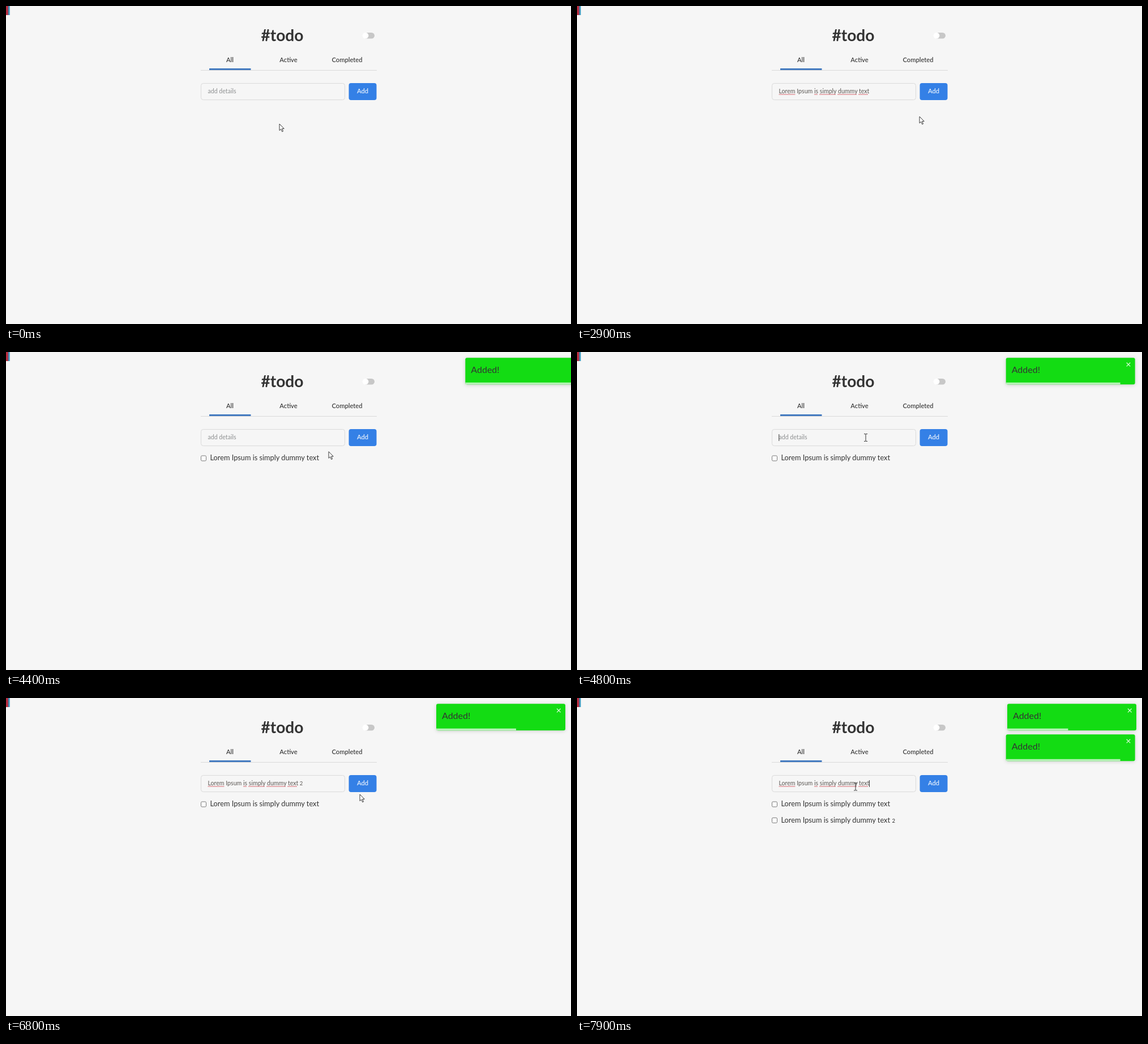
An HTML page for the animation above (8 s loop, 998 by 561 pixels).

```html
<!DOCTYPE html>
<html lang="en">
<head>
<meta charset="utf-8">
<title>Todo list</title>
<style>
  html, body { margin: 0; width: 100%; height: 100%; overflow: hidden; background: #f6f6f6; }
  svg { display: block; width: 998px; height: 561px; font-family: Lato, "Open Sans", sans-serif; }
  text { fill: #333; white-space: pre; }
  .mid { text-anchor: middle; }
  .title { font-size: 28.2px; font-weight: 700; }
  .tab { font-size: 11.2px; font-weight: 500; }
  .field { font-size: 10.6px; }
  .item { font-size: 12.75px; }
  .small { font-size: 9.5px; }
  #button.hover rect { fill: #2f73cf; }
  #button.hover text { fill: #dbe5f3; }
  .toast { filter: drop-shadow(0 1px 3px rgba(0, 0, 0, .16)); }
  .toast text { font-size: 7.2px; font-weight: 700; fill: #fff; }
  #cursor path { stroke-linejoin: round; }
</style>
</head>
<body>
<svg viewBox="0 0 998 561">
  <defs>
    <linearGradient id="strip">
      <stop offset="0" stop-color="#a52c40"/>
      <stop offset=".35" stop-color="#cc2a3c"/>
      <stop offset=".52" stop-color="#75506f"/>
      <stop offset=".7" stop-color="#3f93b8"/>
      <stop offset="1" stop-color="#6cb9d6"/>
    </linearGradient>
    <g id="toastBody">
      <rect width="228" height="47" rx="3" fill="#13dc13"/>
      <text x="10" y="26.5">Added!</text>
      <path d="M213 8.5l6.6 6.6m0-6.6l-6.6 6.6" stroke="#d6fad6" stroke-width="1.3"/>
    </g>
  </defs>
  <rect width="998" height="561" fill="#f6f6f6"/>
  <rect width="7" height="16" fill="url(#strip)"/>

  <text class="title mid" x="488" y="61.7">#todo</text>
  <rect x="631" y="47" width="20" height="10.5" rx="5.25" fill="#c7c7c7"/>
  <circle cx="635" cy="52.2" r="5.4" fill="#fff"/>

  <g class="tab mid">
    <text x="395.5" y="98.7">All</text>
    <text x="499" y="98.7">Active</text>
    <text x="602.5" y="98.7">Completed</text>
  </g>
  <path d="M344 113.5H655" stroke="#dadada"/>
  <rect x="359" y="110" width="73.5" height="3" rx=".5" fill="#447bc0"/>

  <rect x="344.5" y="136.5" width="254" height="29" rx="4" fill="#f6f6f6" stroke="#dadada"/>
  <text id="placeholder" class="field" x="356.5" y="154.4" style="fill:#8d8f90">add details</text>
  <g id="typed">
    <text class="field" x="356.5" y="154.4" style="fill:#5c5854">Lorem Ipsum is simply dummy text<tspan id="suffix" class="small"> 2</tspan></text>
    <path id="spelling" d="M356.5 156H385.5M419 156h6M428 156h29M460 156h34M497 156h17" stroke="#d4646c"/>
  </g>
  <path id="caret" d="M0 145V157" stroke="#333"/>
  <g id="button">
    <rect x="605.5" y="136" width="49" height="30" rx="4" fill="#3480e6"/>
    <text class="tab mid" x="630" y="154.3" style="fill:#f3f7fd">Add</text>
  </g>

  <g id="item1">
    <rect x="344.5" y="183" width="9" height="9" rx="1.8" fill="#fff" stroke="#767676"/>
    <text class="item" x="360.5" y="191.4">Lorem Ipsum is simply dummy text</text>
  </g>
  <g id="item2">
    <rect x="344.5" y="211.3" width="9" height="9" rx="1.8" fill="#fff" stroke="#767676"/>
    <text class="item" x="360.5" y="219.8">Lorem Ipsum is simply dummy text<tspan class="small" dx="1"> 2</tspan></text>
  </g>

  <g class="toast"><use href="#toastBody"/><rect y="43.5" height="3.2" fill="#b4f3b4"/></g>
  <g class="toast"><use href="#toastBody"/><rect y="43.5" height="3.2" fill="#b4f3b4"/></g>

  <g id="cursor">
    <path id="arrow" d="M0 0V11.6L2.7 9.1 4.7 13.7 6.5 12.9 4.6 8.4H8.2Z" fill="#fff" stroke="#222" stroke-width=".9"/>
    <path id="beam" d="M-3-6.5h2.2l.8.7.8-.7H3M0-5.8V5.8M-3 6.5h2.2l.8-.7.8.7H3" fill="none" stroke="#333"/>
    <path id="hand" d="M-1.3 9.5V.8a1.3 1.3 0 0 1 2.6 0V6.2c.3-1 2.4-1 2.6.3.4-.9 2.2-.6 2.3.5.5-.6 1.6-.2 1.6.8V11c0 2-1.3 3-1.3 5.5H-.3C-.6 14.5-2.6 12.5-3.8 9.8-4.4 8.2-2.6 7.6-1.3 9.5Z" fill="#fff" stroke="#222" stroke-width=".9"/>
  </g>
</svg>
<script>
const LOOP = 8000, STEP = 100;
const byId = id => document.getElementById(id);
const show = (id, on) => byId(id).setAttribute('visibility', on ? 'visible' : 'hidden');
const within = (t, spans) => spans.some(([from, to]) => t >= from && t < to);
const easeOut = x => 1 - (1 - x) ** 3;
const linear = x => x;

// Interpolates rows of [time, value, value...]
function track(rows, t, ease = linear) {
  if (t <= rows[0][0]) return rows[0].slice(1);
  const i = rows.findIndex(row => row[0] > t);
  if (i < 0) return rows[rows.length - 1].slice(1);
  const [a, b] = [rows[i - 1], rows[i]];
  const k = ease((t - a[0]) / (b[0] - a[0]));
  return a.slice(1).map((v, n) => v + (b[n + 1] - v) * k);
}

const pointer = [
  [200, 483, 208], [800, 446, 150], [2400, 446, 150], [2900, 605, 195],
  [3300, 620, 186], [3500, 625, 162], [4100, 625, 162], [4200, 612, 186],
  [4300, 590, 184], [4700, 510, 151], [5400, 510, 151], [6000, 519, 176],
  [6200, 519, 176], [6700, 625, 178], [6900, 625, 162], [7100, 625, 162],
  [7400, 492, 156.5]
];
const bounce = [[0, 2137], [.6, -17.8], [.75, 7.1], [.9, -3.6], [1, 0]];
const toasts = [{ start: 3945, y: 10.3 }, { start: 7045, y: 64.3 }];
const toastNodes = document.querySelectorAll('.toast');

function drawToast(node, { start, y }, t) {
  const age = t - start;
  const [x] = track(bounce, (age - 62) / 960, easeOut);
  node.setAttribute('visibility', age > 0 && x < 250 ? 'visible' : 'hidden');
  node.setAttribute('transform', `translate(${760 + x} ${y})`);
  node.querySelector('rect').setAttribute('width', 228 * Math.max(0, 1 - Math.max(0, age) / 7480));
}

function render(t) {
  const [x, y] = track(pointer, t);
  const inRow = y > 136 && y < 166;
  const onInput = inRow && x > 344 && x < 599;
  const onButton = inRow && x > 605 && x < 655;
  byId('cursor').setAttribute('transform', `translate(${x} ${y})`);
  show('beam', onInput);
  show('hand', onButton);
  show('arrow', !onInput && !onButton);
  byId('button').classList.toggle('hover', onButton);

  const filled = within(t, [[2000, 3900], [5000, 7000], [7800, LOOP]]);
  const numbered = within(t, [[6200, 7000]]);
  show('placeholder', !filled);
  show('typed', filled);
  show('suffix', numbered);
  show('spelling', filled && !within(t, [[2000, 2100]]));
  show('caret', within(t, [[1200, 2500], [4700, 5500], [6200, 6700], [7300, LOOP]]));
  byId('caret').setAttribute('transform', `translate(${numbered ? 522.5 : filled ? 516.5 : 356.8})`);

  show('item1', t >= 3900);
  show('item2', t >= 7000);
  toasts.forEach((toast, i) => drawToast(toastNodes[i], toast, t));
}

const began = performance.now();
function tick() {
  const t = (performance.now() - began) % LOOP;
  render(Math.floor(t / STEP) * STEP);
  requestAnimationFrame(tick);
}
tick();
</script>
</body>
</html>
```
